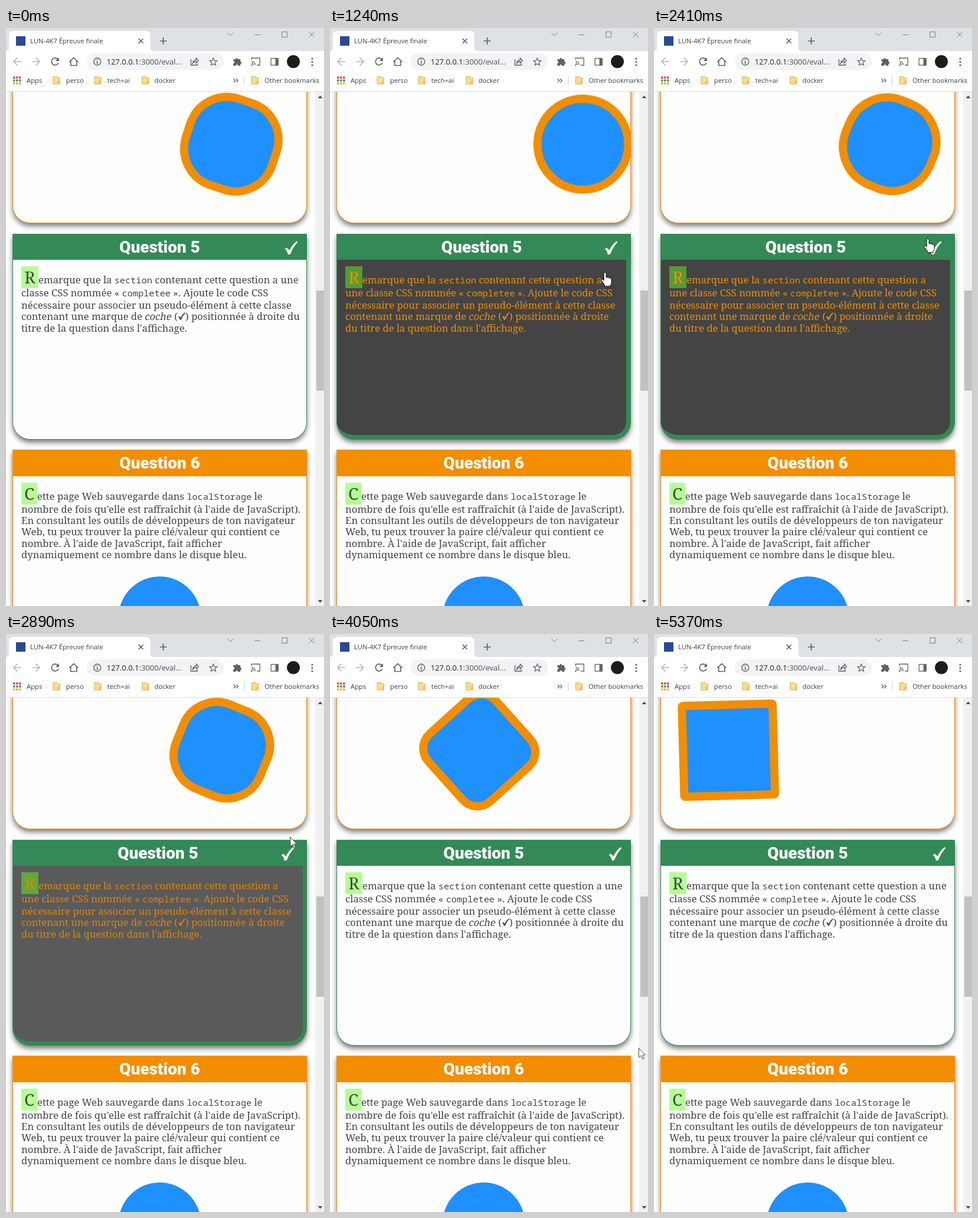
Animation of 540 by 980 pixels, one loop 5.44 s. Source, as an HTML page:

```html
<!DOCTYPE html>
<html lang="fr">
<head>
<meta charset="utf-8">
<title>Épreuve finale</title>
<style>
  :root { --orange: #f28e00; --green: #338a56; --blue: #1e90ff; --ink: #444; --paper: #fefefe; }
  html, body { margin: 0; width: 540px; height: 980px; overflow: hidden; background: var(--paper); }
  body { position: relative; }
  svg { display: block; }
  .layer { position: absolute; left: 0; top: 0; }

  section {
    position: absolute; left: 11px; width: 500px; box-sizing: border-box;
    border: 1px solid var(--orange); border-radius: 0 0 30px 30px;
    background: var(--paper); color: var(--ink);
    box-shadow: 0 5px 8px rgba(0, 0, 0, .5);
    font: 16.7px/20px "Noto Serif", serif;
  }
  #q4 { top: -20px; height: 351px; overflow: hidden; }
  #q5 { top: 349px; height: 349px; border-color: var(--green); }
  #q6 { top: 715px; height: 349px; }
  h2 {
    position: relative; margin: 0; background: var(--orange); color: #fff; text-align: center;
    font: 900 28px/44px Roboto, sans-serif;
  }
  #q5 h2 { background: var(--green); line-height: 43px; }
  h2 svg { position: absolute; right: 14px; top: 11px; }

  .line { position: absolute; left: 14px; top: calc(var(--y) * 1px - 16.5px); white-space: pre; }
  .line.first { left: var(--x); }
  .line svg { display: inline-block; vertical-align: -1px; }
  code { font: 15.3px/0 "Noto Sans Mono", monospace; }
  i { display: inline-block; font-style: normal; line-height: 0; transform: skewX(-12deg); }
  .cap {
    position: absolute; left: 14px; height: 37px; text-align: center;
    background: rgba(95, 255, 30, .48); font-size: 28px; line-height: 37px;
  }
  .disc {
    position: absolute; left: 179px; top: 214px; width: 140px; height: 140px;
    border-radius: 50%; background: var(--blue);
  }
  .wheel {
    position: absolute; left: -3.4px; top: 132px; width: 168px; height: 168px; box-sizing: border-box;
    border: 14px solid var(--orange); background: var(--blue);
    animation: roll 5164ms ease-in-out -8986ms infinite alternate paused;
  }
  .narrow { font-size: 0; }
  #q5, .wide, .narrow, .pointer, .hand, .arrow, .press { animation: 5440ms linear infinite paused; }
  #q5 { animation-name: hover; }
  .wide { animation-name: wide; }
  .narrow { animation-name: narrow; }
  .pointer { animation-name: travel; }
  .hand { animation-name: hand; }
  .arrow { animation-name: arrow; }
  .press { animation-name: press; }
  .wide, .narrow, .hand, .arrow, .press { animation-timing-function: step-end; }

  @keyframes roll {
    from { transform: translateX(336.6px) rotate(1800deg); border-radius: 50%; }
    to { transform: translateX(0) rotate(0deg); border-radius: 0; }
  }
  @keyframes hover {
    0%, 10.85%, 62.1%, 100% {
      background-color: #fefefe; color: #444; border-right-width: 1px; border-bottom-width: 1px;
      animation-timing-function: ease;
    }
    20.95%, 52% {
      background-color: #444; color: #f28e00; border-right-width: 8px; border-bottom-width: 8px;
      animation-timing-function: ease;
    }
  }
  @keyframes wide { 0%, 53.2%, 100% { font-size: 16.7px; } 16.9% { font-size: 0; } }
  @keyframes narrow { 0%, 53.2%, 100% { font-size: 0; } 16.9% { font-size: 16.7px; } }
  @keyframes hand { 0%, 52%, 100% { opacity: 0; } 10.85% { opacity: 1; } }
  @keyframes arrow { 0%, 52%, 100% { opacity: 1; } 10.85% { opacity: 0; } }
  @keyframes press { 0%, 85.6%, 100% { opacity: 0; } 83.1% { opacity: 1; } }
  @keyframes travel {
    0%, 9.2% { transform: translate(600px, 600px); }
    9.9% { transform: translate(510px, 545px); }
    11.2% { transform: translate(485px, 515px); }
    13.8% { transform: translate(436px, 480px); }
    18.4% { transform: translate(452px, 440px); }
    22.8% { transform: translate(467px, 414px); }
    31.6% { transform: translate(470px, 380px); }
    44.3% { transform: translate(465px, 357px); }
    52% { transform: translate(480px, 344px); }
    63.2% { transform: translate(500px, 342px); }
    64.5% { transform: translate(513px, 352px); }
    74.4% { transform: translate(525px, 740px); }
    79% { transform: translate(530px, 880px); }
    83.5% { transform: translate(529px, 972px); }
    86.4%, 100% { transform: translate(530px, 990px); }
  }
  .chrome text { font: 11.3px "Open Sans", sans-serif; fill: #3c4043; }
  .chrome text.url { font-size: 13px; fill: #202124; }
  .stroke { fill: none; stroke: #5f6368; stroke-width: 1.7; }
</style>
</head>
<body>
<section id="q4"><div class="wheel"></div></section>

<section id="q5">
  <h2>Question 5<svg width="23" height="25" viewBox="0 0 23 25" fill="#fff"><path id="check" d="M.5 14C3 10.500 6 11.500 8 16.500Q13 6 20.500.500L22.500 2Q14.500 10 10 22Q8 24 5.500 22.500Q4.500 16 .5 14Z"/></svg></h2>
  <span class="cap" style="top:54px;width:29px">R</span>
  <div class="line first" style="--y:83;--x:43px">emarque que la <code>section</code> contenant cette question a<span class="wide"> une</span></div>
  <div class="line" style="--y:105"><span class="narrow">une </span>classe CSS nommée « <code>completee</code> ». Ajoute le code CSS</div>
  <div class="line" style="--y:126">nécessaire pour associer un pseudo-élément à cette classe</div>
  <div class="line" style="--y:145">contenant une marque de <i>coche</i> (<svg width="13" height="14" viewBox="0 0 23 25" fill="currentColor"><use href="#check"/></svg>) positionnée à droite<span class="wide"> du</span></div>
  <div class="line" style="--y:165"><span class="narrow">du </span>titre de la question dans l'affichage.</div>
</section>

<section id="q6">
  <h2>Question 6</h2>
  <span class="cap" style="top:55px;width:27px">C</span>
  <div class="line first" style="--y:84;--x:41px">ette page Web sauvegarde dans <code>localStorage</code> le</div>
  <div class="line" style="--y:106">nombre de fois qu'elle est raffraîchit (à l'aide de JavaScript).</div>
  <div class="line" style="--y:125">En consultant les outils de développeurs de ton navigateur</div>
  <div class="line" style="--y:144">Web, tu peux trouver la paire clé/valeur qui contient ce</div>
  <div class="line" style="--y:164">nombre. À l'aide de JavaScript, fait afficher</div>
  <div class="line" style="--y:183">dynamiquement ce nombre dans le disque bleu.</div>
  <div class="disc"></div>
</section>

<svg class="layer chrome" width="540" height="980">
  <defs>
    <g id="folder">
      <path d="M1 1.500h7l2 2h2.500v10.500H1z" fill="#fbdc8a" stroke="#e3b04b"/>
      <path d="M8.500 8.500h4v5.500h-4z" fill="#f3c55f"/>
    </g>
  </defs>
  <!-- scrollbar -->
  <rect x="525" y="108" width="15" height="872" fill="#f1f1f1"/>
  <rect x="527" y="445" width="13" height="170" fill="#c1c1c1"/>
  <rect class="press" x="526" y="964" width="14" height="16" fill="#d2d2d2"/>
  <path d="M529.500 119l4-4.500 4 4.500zM529.500 970l4 4.500 4-4.500z" fill="#505050"/>

  <!-- tab strip -->
  <rect width="540" height="39" fill="#dee1e6"/>
  <rect y="39" width="540" height="69" fill="#fff"/>
  <path d="M0 39q5 0 5-6V13q0-8 8-8h224q8 0 8 8v20q0 6 6 6z" fill="#fff"/>
  <rect y="107" width="540" height="1" fill="#dcdee1"/>
  <rect x="17" y="14" width="16" height="16" fill="#264a96"/>
  <text x="41" y="26">LUN-4K7 Épreuve finale</text>
  <path class="stroke" d="M225 18l8 8m0-8l-8 8M261 22h12m-6-6v12"/>
  <g fill="none" stroke="#7c7f84">
    <path d="M376 8l5 5 5-5M422 11.500h10M514.500 6.500l9 9m0-9l-9 9"/>
    <rect x="468.500" y="6.500" width="9" height="9"/>
  </g>

  <!-- toolbar -->
  <path class="stroke" style="stroke:#b5b7ba" d="M26 57H13m6.500-6.500L13 57l6.500 6.500M44 57h13m-6.500-6.500L57 57l-6.500 6.500"/>
  <path class="stroke" d="M88 53a6 6 0 1 0 1 6M107.500 57.500l7.500-7 7.500 7M110 56v7.500h10V56"/>
  <path d="M90 50v6h-6z" fill="#5f6368"/>
  <rect x="137" y="43" width="233" height="28" rx="14" fill="#f1f3f4"/>
  <circle class="stroke" cx="155" cy="57" r="6" style="stroke-width:1.400"/>
  <path class="stroke" d="M155 53v1.600m0 1.600v4.500"/>
  <text class="url" x="171" y="62">127.0.0.1<tspan fill="#4d5156">:3000/eval...</tspan></text>
  <g class="stroke" style="stroke-width:1.300">
    <path d="M315 54h-1v9h11v-3M317 60q1-6 6-6v-3l4 4.500-4 4v-3q-3 0-6 3.500z"/>
    <path d="M352 51l1.800 4.200 4.500.4-3.400 3 1 4.400-3.900-2.300-3.900 2.300 1-4.400-3.400-3 4.500-.4z"/>
    <path d="M417 54v-3h14v12h-5M417 57q6 0 6 6M417 60q3 0 3 3"/>
    <rect x="450" y="51.500" width="12" height="11.500"/>
  </g>
  <path d="M386 53h4a2 2 0 0 1 4 0h4v4a2 2 0 0 1 0 4v3h-4a2 2 0 0 0-4 0h-4v-4a2 2 0 0 0 0-4zM457.500 51h5v12.500h-5zM416 62h2v2h-2z" fill="#5f6368"/>
  <circle cx="488" cy="57" r="11" fill="#1c1c1c"/>
  <g fill="#5f6368"><circle cx="520" cy="52" r="1.600"/><circle cx="520" cy="57.500" r="1.600"/><circle cx="520" cy="63" r="1.600"/></g>

  <!-- bookmarks -->
  <g fill="none" stroke-width="3.400" stroke-dasharray="3.400 1.600">
    <path d="M12 84h13.400" stroke="#e0463a"/>
    <path d="M12 89h13.400" stroke="#3c9d55"/>
    <path d="M12 94h13.400" stroke="#f0b02c"/>
    <path d="M22 89h3.400" stroke="#4285f4"/>
  </g>
  <use href="#folder" x="79" y="81"/><use href="#folder" x="149" y="81"/>
  <use href="#folder" x="230" y="81"/><use href="#folder" x="416" y="81"/>
  <text x="35" y="93">Apps</text>
  <text x="102" y="93">perso</text>
  <text x="172" y="93">tech+ai</text>
  <text x="252" y="93">docker</text>
  <text x="439" y="93">Other bookmarks</text>
  <path class="stroke" style="stroke-width:1.400" d="M386.500 86l3 3-3 3m4.500-6l3 3-3 3"/>
  <rect x="404" y="81" width="1" height="16" fill="#d0d3d8"/>
</svg>

<svg class="layer" width="540" height="980">
  <g class="pointer" fill="#fff" stroke="#000" stroke-linejoin="round">
    <path class="arrow" stroke="#444" d="M.5.500v16l4-3.500 2.500 6 2.500-1-2.500-5.800h4.500z"/>
    <path class="hand" d="M-2 2a2 2 0 0 1 4 0v7c1-1 3-.8 3.500.5c1-.8 2.500-.5 2.800.8c1.500-.5 2.700.3 2.700 2v5c0 3-2 4-2 6.500H0c0-2-3.500-6-6-9.500c-1-1.800.8-3.200 2.500-1.800L-2 14z"/>
  </g>
</svg>

<script>
  const LOOP = 5440, STEP = LOOP / 79;
  const start = performance.now();
  const animations = document.getAnimations();

  // The picture advances in even steps, and every part restarts with the loop.
  function draw() {
    const t = (performance.now() - start) % LOOP;
    const time = Math.min(78, Math.floor((t + 7) / STEP)) * STEP;
    for (const a of animations) a.currentTime = time;
    requestAnimationFrame(draw);
  }
  draw();
</script>
</body>
</html>
```
